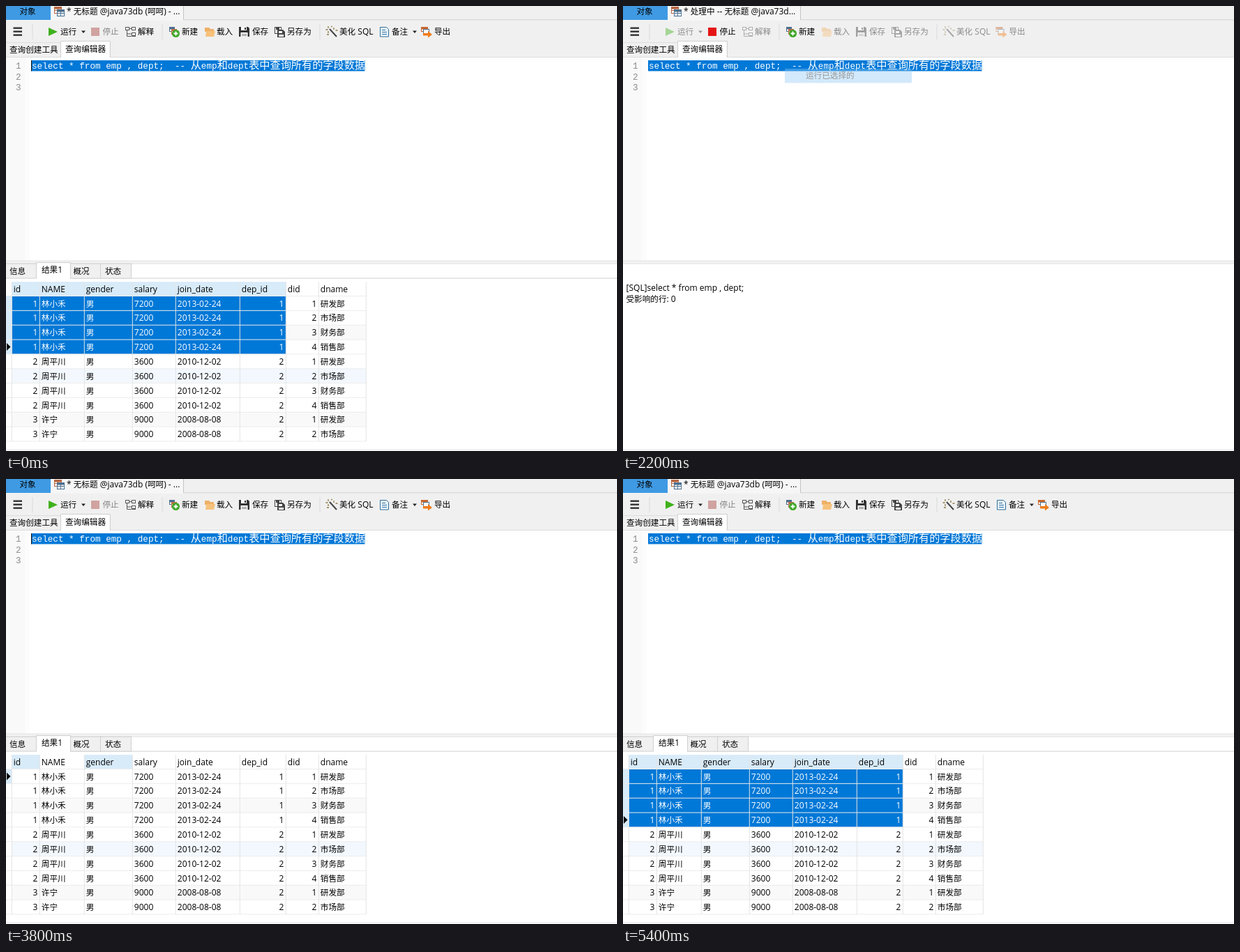
Animation, 876 px wide and 639 px high, one loop 8000 ms. Source, as an HTML page:

```html
<!DOCTYPE html>
<html lang="zh-CN">
<head>
<meta charset="utf-8">
<title>SQL editor</title>
<style>
html, body { margin: 0; width: 100%; height: 100%; overflow: hidden; background: #fff; }
svg { display: block; width: 876px; height: 639px; }
text { font-family: "Open Sans", "Noto Sans CJK SC", "Noto Sans CJK", sans-serif; white-space: pre; }
.code { font-family: "Liberation Mono", "Noto Sans CJK SC", "Noto Sans CJK", monospace; }
</style>
</head>
<body>
<svg id="stage" viewBox="0 0 876 639" xmlns="http://www.w3.org/2000/svg"></svg>
<script>
const LOOP = 8000;
const BLUE = '#0078d7', PALE = '#d8ebf9', BAR = '#f0f0f0', EDGE = '#d0d0d0';

// Each step changes only the listed parts of the state.
const steps = [
  [0, { menu: 0, busy: 0, view: 'full', cols: 6, rows: 4, hover: -1, caret: 1 }],
  [1000, { caret: 0 }],
  [1200, { menu: 1 }],
  [1600, { caret: 1 }],
  [2200, { caret: 0, menu: 2, busy: 1, view: 'log', cols: 1, rows: 0 }],
  [2400, { menu: 0, view: 'grid' }],
  [2600, { caret: 1, busy: 0, view: 'full' }],
  [3200, { caret: 0 }],
  [3800, { caret: 1, hover: 2 }],
  [4000, { hover: 1 }],
  [4200, { hover: -1 }],
  [4400, { caret: 0 }],
  [4800, { cols: 2, rows: 2 }],
  [5000, { cols: 3, rows: 3 }],
  [5200, { cols: 4, rows: 4 }],
  [5400, { cols: 6 }]
];

const rect = (x, y, w, h, fill, more = '') =>
  `<rect x="${x}" y="${y}" width="${w}" height="${h}" fill="${fill}" ${more}/>`;
const path = (d, fill, more = '') => `<path d="${d}" fill="${fill}" ${more}/>`;
const line = (d, color, w = 1) => path(d, 'none', `stroke="${color}" stroke-width="${w}"`);
const group = (id, body, more = '') => `<g id="${id}" ${more}>${body}</g>`;
const mix = (s, size) =>
  s.replace(/[\u2e80-\uffef]+/g, m => `<tspan font-size="${size}">${m}</tspan>`);
// y is the middle of the line of text
const label = (x, y, s, more = '') =>
  `<text x="${x}" y="${y + 4.3}" font-size="12" ${more}>${mix(s, 11.6)}</text>`;
const code = (x, s, y = 89.5, fill = '#fff') =>
  `<text class="code" x="${x}" y="${y}" font-size="12.65" fill="${fill}">${s}</text>`;
const drop = x => path(`M${x} 35.5h6l-3 3.5z`, '#222');

// Toolbar icons
const sheet = (x, y, w, h, color) =>
  rect(x, y, w, h, '#fff', `stroke="${color}"`) + rect(x, y, w, 3, color);
const tree = [[171, 30], [180, 30], [180, 38]].map(([x, y]) =>
  rect(x + .5, y + .5, 5, 4, '#fff', 'stroke="#555"')).join('') +
  line('M173.5 35v8.5h7M176 32.5h4M173.5 40h7', '#555') + line('M181 43.5h5', '#555');
const create = sheet(234.5, 30.5, 7, 6, '#4b6f8f') + sheet(237.5, 33.5, 7, 7, '#c0704a') +
  '<circle cx="243.5" cy="39.5" r="5.5" fill="#3da627"/>' +
  line('M240.5 39.5h6M243.5 36.5v6', '#fff', 1.8);
const folder = path('M285 31h6l2 2h5v4h-13z', '#eeb067') + path('M287 36h13l-2 8h-12z', '#f6c27c');
const disk = path('M334 30h13l2 2v12h-15z', '#333') + rect(337, 30, 8, 5, '#fff') +
  rect(342, 31, 2, 3, '#333') + rect(336.5, 38, 10, 6, '#fff') + line('M338 40.5h7M338 42.5h7', '#777');
const disks = rect(385.5, 30.5, 9, 9, '#fff', 'stroke="#444"') + rect(387, 30, 5, 4, '#444') +
  path('M389 34h8l3 3v8h-11z', '#444') + rect(391, 36, 5, 3, '#fff') + rect(391, 41, 7, 3, '#fff');
const wand = line('M464 33l10 11', '#444', 2) +
  line('M462 29v3M462 36v3M458.5 34h3M466 30l2-1M470 31v3M472.5 35h3M460 41h3', '#8a7a45', 1.3);
const note = path('M536.5 30.5h9l3 3v10.5h-12z', '#eaf4fb', 'stroke="#2f6f9f"') +
  line('M539 34.5h5M539 37.5h7M539 40.5h7', '#2f6f9f');
const exporter = sheet(595.5, 30.5, 9, 6, '#c9682f') + rect(598.5, 33.5, 8, 6, '#fff', 'stroke="#4b6f8f"') +
  path('M598 39h7v-3l6 5-6 4.5v-3h-7z', '#ef7d1a');

function toolbar() {
  const run = path('M61 31l13 6-13 6z', '#3fb11d') + label(78, 37, '运行') + drop(108);
  const stop = rect(122, 31, 12, 12, '#d0a3a0', 'id="stopBox"') + label(138.5, 37, '停止', 'id="stopText"');
  const sep = [38, 224, 450].map(x => rect(x - .5, 26, 1, 22, '#dadada')).join('');
  return rect(0, 20.5, 876, 53.5, BAR) + [31, 36, 41].map(y => rect(10.5, y - .5, 12.5, 2.4, '#333')).join('') + sep + stop +
    create + label(252, 37, '新建') +
    group('tools', run + tree + label(189, 37, '解释') + folder + label(302, 37, '载入') +
      disk + label(353, 37, '保存') + disks + label(403, 37, '另存为') + wand + label(478, 37, '美化 SQL') +
      group('note', note + label(553, 37, '备注') + drop(583)) +
      group('export', exporter + label(614, 37, '导出')));
}

function header() {
  const icon = sheet(69.5, 1.5, 10, 9, '#b5653f') + line('M70 6.5h9M74.5 4v6', '#b5653f') +
    sheet(73.5, 5.5, 10, 9, '#4b6f8f') + line('M74 10.5h9M78.5 8v6', '#4b6f8f');
  return rect(0, 0, 876, 20, BAR) + rect(0, 0, 64, 20, '#3f9ae3') + label(19.5, 8, '对象') +
    line('M254.5 0V20H876', '#c4c4c4') + rect(64, 0, 190, 20.5, '#f6f6f6') + icon +
    label(87, 8, '', 'id="title"');
}

function editor() {
  return rect(0, 74, 876, 292, '#fff') + rect(0, 74, 34, 292, '#fcfcfc') + rect(0, 74, 27, 292, '#f9f9f9') +
    line('M0 73.5H78M149 73.5H876', '#dcdcdc') + line('M0 52.5H78', '#dedede') +
    rect(78.5, 50.5, 70, 24, '#fff') + line('M78.5 74V50.5H149.5V74', EDGE) +
    label(5, 62.5, '查询创建工具') + label(85, 61.3, '查询编辑器') +
    [1, 2, 3].map(n => code(14, n, 75 + 15.3 * n, '#8c8c8c')).join('') +
    rect(36, 78, 478.5, 15.5, BLUE) +
    code(37, 'select * from emp , dept;') + code(242, '--') +
    code(264.7, mix('从emp和dept表中查询所有的字段数据', 15.18)) +
    rect(36, 78, 1, 15.5, '#111', 'id="caret"');
}

// Result grid
const edges = [8, 48, 112, 181, 243, 335, 401, 448, 516];
const heads = ['id', 'NAME', 'gender', 'salary', 'join_date', 'dep_id', 'did', 'dname'];
const people = [
  [1, '林小禾', '男', 7200, '2013-02-24', 1],
  [2, '周平川', '男', 3600, '2010-12-02', 2],
  [3, '许宁', '男', 9000, '2008-08-08', 2]
];
const depts = ['研发部', '市场部', '财务部', '销售部'];
const ROW = 20.85, TOP = 416.5, ROWS = 10;
const rowY = r => TOP + ROW * r;

function grid() {
  let out = rect(0, 392, 876, 240, '#fff');
  heads.forEach((s, c) => {
    out += rect(edges[c] + .5, 396, edges[c + 1] - edges[c], 20.5, PALE, `id="h${c}"`) +
      label(edges[c] + 2.8, 406.5, s);
  });
  for (let r = 0; r < ROWS; r++) {
    const tint = r % 3 < 2 ? '#fff' : r === 5 ? '#f2f8fe' : '#f9f9f9';
    out += rect(8, rowY(r), 508, ROW, tint) + rect(0, rowY(r), 8, ROW, PALE, `id="g${r}"`);
  }
  out += rect(8.5, TOP, 0, 0, BLUE, 'id="sel"');
  let lines = '';
  for (let r = 0; r <= ROWS; r++) lines += `M0 ${rowY(r)}H516`;
  out += line(lines, '#ececec') + line(edges.map(x => `M${x + .3} 396V625`).join(''), '#e4e4e4');
  for (let r = 0; r < ROWS; r++) {
    const cells = [...people[r >> 2], r % 4 + 1, depts[r % 4]];
    cells.forEach((v, c) => {
      const right = c === 0 || c === 5 || c === 6;
      const x = right ? edges[c + 1] - 2.7 : edges[c] + 2.8;
      out += label(x, rowY(r) + 10.8, String(v), `id="c${r}_${c}" text-anchor="${right ? 'end' : 'start'}"`);
    });
  }
  return out + path('M1 -5.5l5.5 5.5-5.5 5.5z', '#000', 'id="arrow"');
}

function results() {
  const tab = x => rect(x, 370, 44, 21, BAR, `stroke="${EDGE}"`);
  return rect(0, 366, 876, 273, '#fff') + rect(0, 366, 876, 4, '#f3f3f3') +
    line('M0 366H876M0 370H876', '#e0e0e0') + rect(0, 636, 876, 2, '#f0f0f0') +
    group('data', line('M92 391H876', EDGE) + tab(-.5) + label(5, 380.5, '信息') +
      group('extra', tab(92) + tab(135.5) + label(96.5, 380.5, '概况') + label(142, 380.5, '状态')) +
      rect(44, 368.5, 48, 24, '#fff') + line('M43.5 391V368.5H92.5V391', EDGE) +
      label(51, 379, '结果1') + grid()) +
    group('log', label(4.5, 405, '[SQL]select * from emp , dept;') + label(4.5, 421, '受影响的行: 0'));
}

function menu() {
  const items = [[121, '从这里运行一个语句'], [148, '撤消'], [169, '重做'], [196.5, '剪切'],
    [217.5, '复制'], [238, '含引号复制'], [258.5, '粘贴'], [286, '全选']];
  return group('menu', rect(229.5, 87.5, 187, 212, '#f1f1f1', 'stroke="#c6c6c6"') +
      line('M259 134.5H413M259 183.5H413M259 272.5H413', '#d6d6d6') +
      items.map(([y, s]) => label(262, y, s)).join('') + line('M401 234.5l3.5 3.5-3.5 3.5', '#333', 1.2)) +
    group('pick', rect(232, 90, 182, 20.5, '#91c9f7') + label(262, 100, '运行已选择的'));
}

document.getElementById('stage').innerHTML = header() + toolbar() + editor() + results() + menu();

const $ = id => document.getElementById(id);
const show = (id, on) => { $(id).style.display = on ? '' : 'none'; };
const attr = (id, name, v) => $(id).setAttribute(name, v);

function apply(s) {
  $('title').innerHTML = mix(s.busy ? '* 处理中 -- 无标题 @java73d...' : '* 无标题 @java73db (呵呵) - ...', 11.6);
  attr('tools', 'opacity', s.busy ? .42 : 1);
  attr('stopBox', 'fill', s.busy ? '#e51414' : '#d0a3a0');
  attr('stopText', 'fill', s.busy ? '#000' : '#858585');
  show('note', !s.busy);
  attr('export', 'transform', `translate(${s.busy ? -60.5 : 0})`);
  show('caret', s.caret);
  show('menu', s.menu === 1);
  show('pick', s.menu);
  attr('pick', 'opacity', s.menu === 2 ? .4 : 1);
  show('log', s.view === 'log');
  show('data', s.view !== 'log');
  show('extra', s.view === 'full');
  heads.forEach((_, c) => show('h' + c, c < s.cols || c === s.hover));
  attr('sel', 'width', edges[s.cols] - 8);
  attr('sel', 'height', ROW * s.rows);
  const last = Math.max(s.rows, 1) - 1;
  attr('arrow', 'transform', `translate(0 ${rowY(last) + 10.4})`);
  for (let r = 0; r < ROWS; r++) {
    show('g' + r, r <= last);
    heads.forEach((_, c) => attr(`c${r}_${c}`, 'fill', r < s.rows && c < s.cols ? '#fff' : '#000'));
  }
}

let shown = -1;
function tick() {
  const t = performance.now() % LOOP;
  const n = steps.filter(([at]) => at <= t).length;
  if (n !== shown) {
    shown = n;
    apply(Object.assign({}, ...steps.slice(0, n).map(step => step[1])));
  }
  requestAnimationFrame(tick);
}
tick();
</script>
</body>
</html>
```
